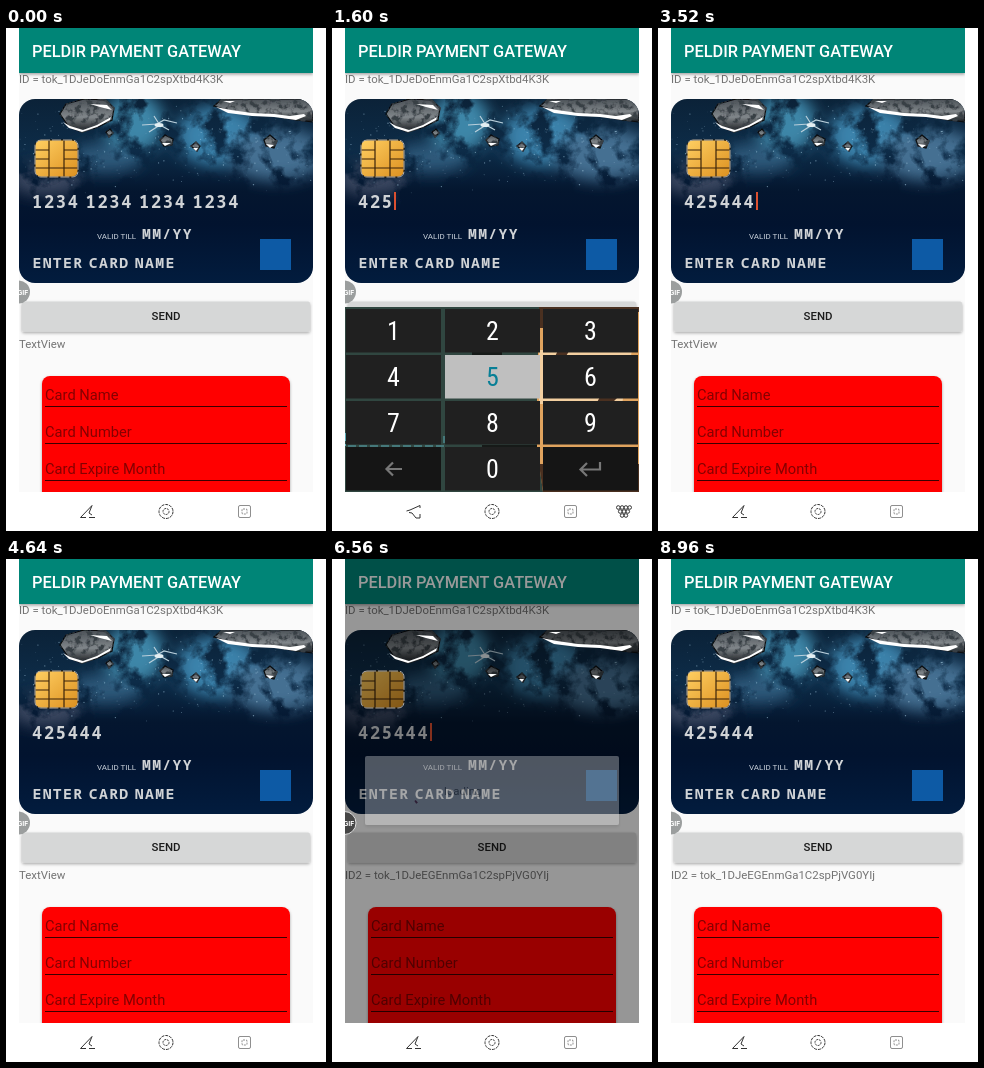
Write an HTML page that moves like this. It is 320x503 px and loops after 9.44 s.

```html
<!DOCTYPE html>
<html lang="en">
<head>
<meta charset="utf-8">
<title>Card payment form</title>
<style>
  html, body { margin: 0; width: 100%; height: 100%; overflow: hidden; background: #fff; }
  svg { display: block; width: 100%; height: 100%; }
  text { font-family: Roboto, Inter, sans-serif; white-space: pre; }
  .label { font-size: 11.43px; fill: #737373; }
  .hint { font-size: 14.7px; fill: #850000; }
  .emboss { font-family: "Noto Sans Mono", "DejaVu Sans Mono", monospace; fill: #d0d3d6; }
  .number { font-size: 17px; font-weight: 600; letter-spacing: 1.7px; word-spacing: -6px; }
  .small { font-size: 14.8px; font-weight: 600; letter-spacing: 1.3px; word-spacing: -4.8px; }
  .key { font-family: "Roboto Condensed", Roboto, sans-serif; font-stretch: 80%; font-size: 26px; text-anchor: middle; }
  .icon { fill: none; stroke: #333; stroke-width: 1; }
</style>
</head>
<body>
<svg viewBox="0 0 320 503" xmlns="http://www.w3.org/2000/svg">
  <defs>
    <clipPath id="screenClip"><rect x="13" width="294" height="464"/></clipPath>
    <clipPath id="cardClip"><rect x="13" y="71" width="294" height="184" rx="16"/></clipPath>
    <linearGradient id="sky" x2="0" y2="1">
      <stop offset="0" stop-color="#0b2238"/>
      <stop offset=".28" stop-color="#0d2c48"/>
      <stop offset=".5" stop-color="#04162f"/>
      <stop offset=".68" stop-color="#02132f"/>
      <stop offset="1" stop-color="#021c3e"/>
    </linearGradient>
    <linearGradient id="gold" x2="1" y2="1">
      <stop offset="0" stop-color="#ffcf62"/>
      <stop offset="1" stop-color="#dc9020"/>
    </linearGradient>
    <linearGradient id="rock" x2="0" y2="1">
      <stop offset="0" stop-color="#4a5056"/>
      <stop offset=".55" stop-color="#80868a"/>
      <stop offset="1" stop-color="#15181b"/>
    </linearGradient>
    <filter id="cloud" x="-20%" y="-20%" width="140%" height="140%">
      <feGaussianBlur in="SourceGraphic" stdDeviation="8" result="glow"/>
      <feTurbulence type="fractalNoise" baseFrequency=".045" numOctaves="5" seed="4"/>
      <feColorMatrix values="0 0 0 0 0  0 0 0 0 0  0 0 0 0 0  4 0 0 0 -1.2"/>
      <feComposite in="glow" operator="in"/>
    </filter>
    <filter id="rough">
      <feTurbulence type="fractalNoise" baseFrequency=".16" numOctaves="3" seed="7"/>
      <feColorMatrix values="0 0 0 0 .04  0 0 0 0 .05  0 0 0 0 .06  5 0 0 0 -2.3"/>
      <feComposite in2="SourceAlpha" operator="in" result="grain"/>
      <feMerge><feMergeNode in="SourceGraphic"/><feMergeNode in="grain"/></feMerge>
    </filter>
    <filter id="shadow" x="-10%" y="-20%" width="120%" height="150%">
      <feDropShadow dx="0" dy="1.5" stdDeviation="1.4" flood-opacity=".35"/>
    </filter>
  </defs>

  <rect width="320" height="503" fill="#fff"/>
  <g clip-path="url(#screenClip)">
    <rect x="13" width="294" height="464" fill="#fafafa"/>
    <text class="label" x="13" y="55">ID = tok_1DJeDoEnmGa1C2spXtbd4K3K</text>

    <g clip-path="url(#cardClip)">
      <rect x="13" y="71" width="294" height="184" fill="url(#sky)"/>
      <g filter="url(#cloud)">
        <ellipse cx="128" cy="95" rx="30" ry="30" fill="#3d86a8"/>
        <ellipse cx="212" cy="108" rx="42" ry="30" fill="#3a82ab"/>
        <ellipse cx="270" cy="126" rx="48" ry="26" fill="#456f92"/>
        <ellipse cx="100" cy="130" rx="36" ry="14" fill="#2d5a7c"/>
        <ellipse cx="40" cy="152" rx="36" ry="15" fill="#3c4a62"/>
      </g>
      <g id="stars"/>
      <g fill="url(#rock)" stroke="#080b0e" stroke-width="1.2" filter="url(#rough)">
        <path d="M54 86 60 76 78 71 100 72 108 80 106 92 92 99 76 104 63 99Z"/>
        <path d="M208 78 216 71H307V94L290 92 268 88 246 87 224 83Z"/>
        <path d="M154 112 159 107 167 111 166 117 158 118Z"/>
        <path d="M258 112 264 107 271 113 268 120 260 118Z"/>
        <path d="M185 118 190 114 194 118 191 123Z"/>
        <path d="M100 104 104 101 107 105 103 109Z"/>
      </g>
      <path d="M136 97 151 96 158 92 171 95M143 104 154 97 163 102M148 88 155 99" fill="none" stroke="#b9cfdb" stroke-width="1.2"/>
      <ellipse cx="153" cy="97" rx="4.5" ry="2" fill="#e3eef2"/>
      <rect x="29" y="112" width="43" height="37" rx="6" fill="url(#gold)" stroke="#1c1408"/>
      <path d="M29 122H43V112M29 131H43M29 140H43V149M72 122H58V112M72 131H58M72 140H58V149M43 122V140H58V122" fill="none" stroke="#3a230a" stroke-width="1.2"/>
      <text id="number" class="emboss number" x="26" y="179.500"></text>
      <text x="91" y="211" font-size="8" fill="#c9d0da">VALID TILL</text>
      <text class="emboss small" x="136" y="211">MM/YY</text>
      <text class="emboss small" x="26.500" y="239.500">ENTER CARD NAME</text>
      <rect x="254" y="211" width="31" height="31" fill="#0d5aa5"/>
      <rect id="caret" y="164" width="2" height="18" fill="#dc5030"/>
    </g>

    <rect id="send" x="16" y="273.500" width="288" height="30" rx="2" fill="#d6d7d7" filter="url(#shadow)"/>
    <text x="160" y="292.300" font-size="11.43" font-weight="500" fill="#1c1c1c" text-anchor="middle">SEND</text>
    <text id="result" class="label" x="13" y="320"></text>

    <rect x="36" y="348" width="248" height="140" rx="8" fill="#f00" filter="url(#shadow)"/>
    <g id="fields"/>

    <rect x="13" y="-5" width="294" height="50" fill="#008577" filter="url(#shadow)"/>
    <text x="26" y="29" font-size="16.33" font-weight="500" fill="#fff">PELDIR PAYMENT GATEWAY</text>

    <g id="keyboard">
      <rect x="13" y="279" width="294" height="185" fill="#304640"/>
      <path d="M207 279H307V464H211L205 420V372Z" fill="#e0a35e"/>
      <path d="M207 322H300L290 376H207Z" fill="#f3cfa0"/>
      <path d="M207 279H307V284H230L215 300H207ZM228 318H240L230 335H220ZM270 365H290L275 380H262ZM207 436H307V464H211Z" fill="#4a3020"/>
      <path d="M150 417H205V420H150ZM140 324H170V328H140Z" fill="#161a18"/>
      <path d="M13.500 405V418M16 418H112V408" stroke="#5aa9b4" stroke-dasharray="8 3" fill="none"/>
      <g id="keys"/>
      <path d="M70 441H55M61 434.500 54.500 441 61 447.500M268 434V441.500H249M255 435 248.500 441.500 255 448" fill="none" stroke="#777" stroke-width="2.2"/>
    </g>

    <rect id="dim" x="13" width="294" height="464"/>
    <g id="dialog">
      <rect x="33" y="197" width="254" height="69" rx="2" fill="#fff" filter="url(#shadow)"/>
      <path id="spinner" fill="none" stroke="#93405f" stroke-width="3.4"/>
      <text class="label" x="112" y="236">loading</text>
    </g>

    <circle id="bubble" cx="12.500" cy="264" r="11.500"/>
    <text x="11.500" y="266.600" font-size="7" font-weight="700" fill="#fff">GIF</text>

    <g fill="#fff">
      <path d="M57 94 64 98 77 102 91 97 105 89 104 92 91 99 76 104 63 100ZM84 76 101 77 106 82 94 79Z"/>
      <path d="M210 79 225 82 246 85 268 86 284 88 298 86 300 88 290 92 268 89 246 88 222 85ZM217 73H229L224 75Z"/>
      <path d="M156 115 165 115 159 118ZM260 116 268 117 264 120ZM187 120H192L190 123Z"/>
      <rect x="29" y="112" width="43" height="37" rx="6" fill="none" stroke="#fff" stroke-opacity=".65" stroke-dasharray="9 2"/>
    </g>
  </g>

  <path id="back" class="icon"/>
  <circle class="icon" cx="160" cy="483.500" r="7" stroke-dasharray="3 1"/>
  <circle class="icon" cx="160" cy="483.500" r="3" stroke-dasharray="2 1"/>
  <g class="icon" stroke-opacity=".55">
    <rect x="232.500" y="477.500" width="12" height="12" rx="1.500"/>
    <rect x="236" y="481" width="5" height="5" rx="1" stroke-dasharray="2 1"/>
  </g>
  <g id="switcher" class="icon" stroke-width="1.4"/>
</svg>

<script>
const LOOP = 9440, STEP = 160;
const $ = id => document.getElementById(id);

function add(parent, tag, attrs, text = '') {
  const node = document.createElementNS('http://www.w3.org/2000/svg', tag);
  for (const name in attrs) node.setAttribute(name, attrs[name]);
  node.textContent = text;
  parent.append(node);
  return node;
}

function set(id, attrs) {
  for (const name in attrs) $(id).setAttribute(name, attrs[name]);
}

let seed = 11;
const random = () => (seed = seed * 16807 % 2147483647) / 2147483647;
for (let i = 0; i < 200; i++) {
  add($('stars'), 'circle', {
    cx: 14 + 292 * random(), cy: 72 + 70 * random() + 25 * random(),
    r: .3 + .4 * random(), fill: '#a9cfe4', opacity: .2 + .5 * random()
  });
}

['Card Name', 'Card Number', 'Card Expire Month'].forEach((name, i) => {
  const y = 372 + 37 * i;
  add($('fields'), 'text', { class: 'hint', x: 39, y }, name);
  add($('fields'), 'rect', { x: 39, y: y + 6, width: 242, height: 1, fill: '#3a0000' });
});

const keys = [...'123456789', '', '0', ''].map((digit, i) => {
  const x = Math.round(14 + 98.5 * (i % 3)), y = 281 + 46 * Math.floor(i / 3);
  const fill = digit ? '#202020' : '#151515';
  return {
    digit,
    box: add($('keys'), 'rect', { x, y, width: 95, height: 43.5, fill }),
    label: add($('keys'), 'text', { class: 'key', x: x + 47.5, y: y + 31 }, digit),
    fill
  };
});

for (let row = 0; row < 3; row++) {
  const count = 4 - row;
  for (let col = 0; col < count; col++) {
    add($('switcher'), 'circle', { cx: 292 + 3.8 * (col - (count - 1) / 2), cy: 479.5 + 4 * row, r: 1.8 });
  }
}

// Each entry: time, digits typed so far, key held down
const typing = [
  [1120, 1, '4'], [1280, 1, ''], [1440, 2, '2'], [1600, 3, '5'], [1760, 3, ''],
  [1920, 4, '4'], [2080, 4, ''], [2240, 5, '4'], [2400, 6, '4'], [2560, 6, '']
];
const keyboardShown = [[0, 0], [320, .5], [480, 1], [3200, .75], [3360, .2], [3520, 0]];
const caretToggles = [160, 800, 1120, 2560, 3200, 3680, 4160, 4640, 5280, 7040, 7520, 8000, 8480, 8960];
// Each entry: time, dim, dialog opacity
const loading = [[0, 0, 0], [5280, .3, .5], [5440, .6, 1], [6400, .55, .8], [6560, .4, .3], [6720, 0, 0]];

const latest = (list, t) => list.findLast(entry => entry[0] <= t);
const ease = x => x < .5 ? 4 * x ** 3 : 1 - (2 - 2 * x) ** 3 / 2;

function spinnerPath(t) {
  const phase = (t - 5147) / 1333, part = phase % 1;
  const tail = 270 * ease(Math.max(0, 2 * part - 1));
  const head = 270 * ease(Math.min(1, 2 * part));
  const turn = 90 * part + .133 * (t - 5440) - 105;
  const point = angle => {
    const a = (angle + turn) * Math.PI / 180;
    return `${76 + 13.5 * Math.cos(a)} ${232 + 13.5 * Math.sin(a)}`;
  };
  const sweep = Math.max(head - tail, 8);
  return `M${point(tail)}A13.5 13.5 0 ${sweep > 180 ? 1 : 0} 1 ${point(tail + sweep)}`;
}

function draw(t) {
  const [, count, held] = latest(typing, t) || [0, 0, ''];
  $('number').textContent = count ? '425444'.slice(0, count) : '1234 1234 1234 1234';

  const caretOn = caretToggles.filter(time => time <= t).length % 2;
  set('caret', { x: 26 + 12 * count, opacity: caretOn });

  const shown = latest(keyboardShown, t)[1];
  set('keyboard', { transform: `translate(0 ${185 * (1 - shown)})`, opacity: shown ? 1 : 0 });
  set('switcher', { opacity: shown ? 1 : 0 });
  set('back', { d: shown
    ? 'M74.5 483 78 482 88 477.500V480M77 484.500 80 485 84 490H88V486'
    : 'M86 477.500 74.500 489.500H80M86 477.500 83 485 86 487M83 489.500H89' });
  for (const key of keys) {
    const down = held !== '' && key.digit === held;
    key.box.setAttribute('fill', down ? '#bfbfbf' : key.fill);
    key.label.setAttribute('fill', down ? '#087f96' : '#fff');
  }

  const [, dim, opacity] = latest(loading, t);
  set('dim', { opacity: dim });
  set('dialog', { opacity });
  if (opacity) set('spinner', { d: spinnerPath(t) });
  set('send', { fill: t === 5280 ? '#bcbdbd' : '#d6d7d7' });
  set('bubble', dim
    ? { fill: '#454545', stroke: '#ddd' }
    : { fill: '#9b9e9e', stroke: 'none' });
  $('result').textContent = t >= 6400 ? 'ID2 = tok_1DJeEGEnmGa1C2spPjVG0YIj' : 'TextView';
}

const start = performance.now();
let drawn = -1;
function tick() {
  const elapsed = (performance.now() - start) % LOOP;
  const time = Math.floor(elapsed / STEP) * STEP;
  if (time !== drawn) draw(drawn = time);
  requestAnimationFrame(tick);
}
tick();
</script>
</body>
</html>
```
